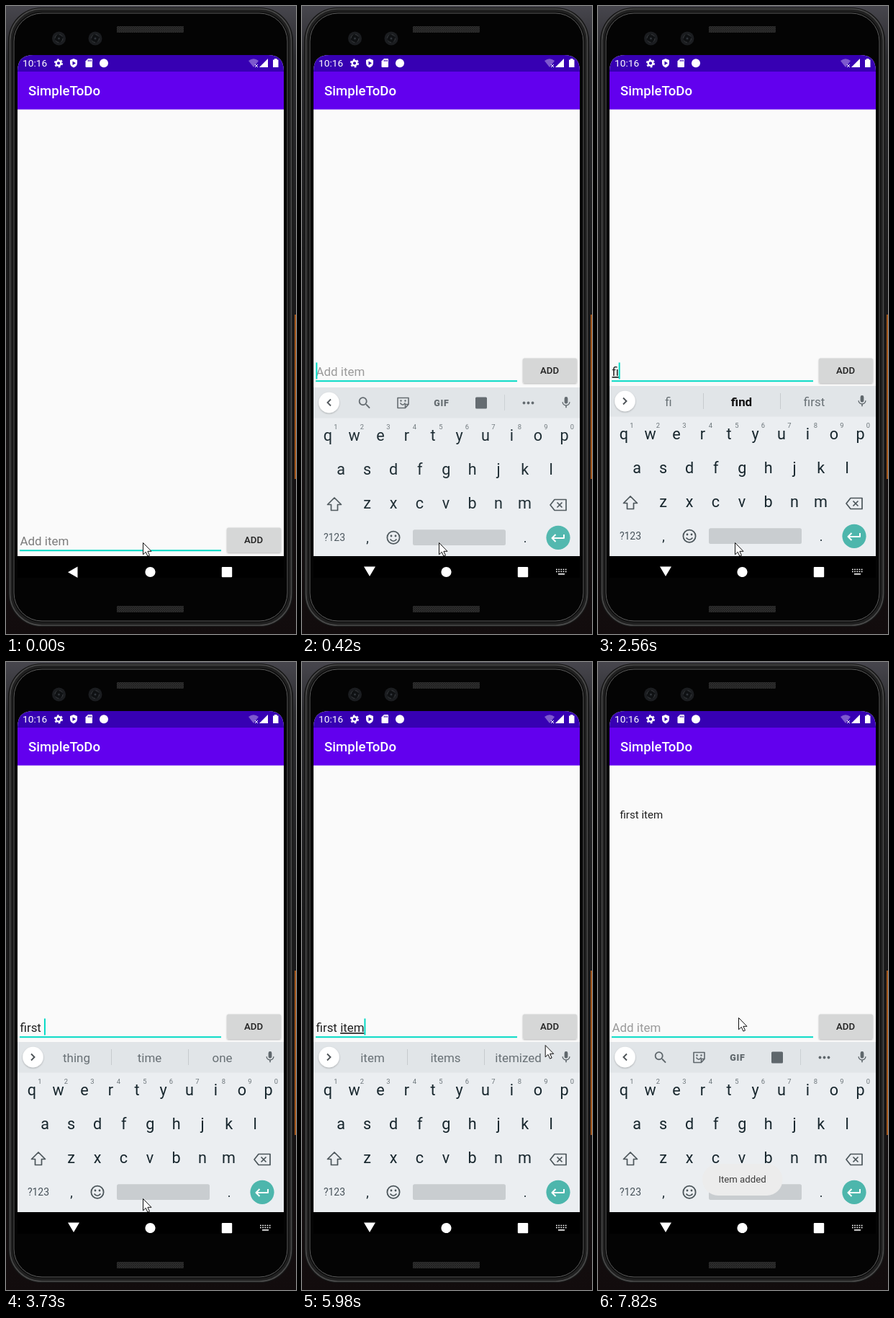
Write an HTML page that moves like this. It is 403x871 px and loops after 8 s.

```html
<!DOCTYPE html>
<html lang="en">
<head>
<meta charset="utf-8">
<title>To-do list demo</title>
<style>
  html, body { margin: 0; width: 100%; height: 100%; overflow: hidden; background: #111; }
  svg { display: block; width: 100vw; height: 100vh; }
  text { font-family: Roboto, sans-serif; white-space: pre; }
  .mid { text-anchor: middle; }
  .medium { font-weight: 500; }
  .underline { text-decoration: underline; text-decoration-thickness: 1px; text-decoration-skip-ink: none; }
</style>
</head>
<body>
<svg viewBox="0 0 403 871" preserveAspectRatio="none">
  <defs>
    <linearGradient id="desk" x2="0" y2="1">
      <stop offset="0" stop-color="#47464d"/><stop offset=".08" stop-color="#2b2b2e"/>
      <stop offset=".4" stop-color="#1b1b1c"/><stop offset="1" stop-color="#120c0d"/>
    </linearGradient>
    <pattern id="mesh" width="3" height="3" patternUnits="userSpaceOnUse">
      <rect width="3" height="3" fill="#303030"/>
      <path d="M0 0L3 3M3 0L0 3" stroke="#1b1b1b" stroke-width=".7"/>
    </pattern>
    <clipPath id="screen"><path d="M16 763V90Q16 68 38 68H364Q386 68 386 90V763Z"/></clipPath>
    <filter id="shadow" x="-20%" y="-20%" width="140%" height="150%">
      <feDropShadow dx="0" dy="1" stdDeviation="1" flood-opacity=".28"/>
    </filter>
  </defs>

  <rect width="403" height="871" fill="url(#desk)"/>
  <rect x="401" y="428" width="2" height="228" fill="#a3561b"/>
  <rect x="3" y="2" width="396" height="859" rx="46" fill="#161616"/>
  <rect x="5.5" y="4" width="391" height="855" rx="44" fill="#202020" stroke="#4b4b4b" stroke-width="1.5"/>
  <rect x="9" y="8" width="384" height="847" rx="41" fill="#0d0d0d"/>
  <rect x="11" y="10" width="380" height="843" rx="39" fill="#040404" stroke="#5c5c5c"/>
  <rect x="154" y="28" width="93" height="9" rx="1" fill="url(#mesh)"/>
  <rect x="154" y="832" width="93" height="9" rx="1" fill="url(#mesh)"/>
  <g id="cameras"></g>

  <g clip-path="url(#screen)">
    <rect x="16" y="68" width="370" height="695" fill="#fafafa"/>
    <rect x="16" y="91" width="370" height="52.500" fill="#6200ee"/>
    <rect x="16" y="68" width="370" height="23" fill="#3700b3"/>
    <text x="31" y="124" font-size="18.6" class="medium" fill="#fff">SimpleToDo</text>
    <g id="status" fill="#fff"></g>
    <text id="item" x="30.500" y="217" font-size="15.070" fill="#212121">first item</text>

    <g id="form">
      <text id="hint" x="19.500" y="513" font-size="16.960" fill="#999">Add item</text>
      <text id="field" x="19.500" y="513" font-size="16.960" fill="#212121"><tspan id="done"></tspan><tspan id="typing" class="underline"></tspan></text>
      <rect id="caret" y="494.500" width="2" height="23" fill="#03dac5"/>
      <rect x="19" y="519.200" width="280" height="2" fill="#03dac5"/>
      <rect id="button" x="307" y="488.500" width="75" height="34.500" rx="2" filter="url(#shadow)"/>
      <text x="344" y="510.300" font-size="13.190" class="mid medium" fill="#212121">ADD</text>
    </g>

    <g id="keyboard">
      <rect x="16" y="527" width="370" height="250" fill="#ebeef1"/>
      <rect x="16" y="527" width="370" height="42.500" fill="#e1e5e8"/>
      <circle cx="37.500" cy="548" r="14.300" fill="#fff" filter="url(#shadow)"/>
      <path id="chevron" fill="none" stroke="#4d5357" stroke-width="1.900"/>
      <g id="keys" fill="#17262d"></g>
      <g id="tools" fill="#5f676c"></g>
      <g id="words" font-size="16.960" class="mid" fill="#687075"></g>
    </g>

    <g id="toast">
      <rect x="145" y="696" width="111.500" height="44" rx="22" fill="#ececec"/>
      <text x="200.500" y="722" font-size="13.190" class="mid" fill="#3c3c3c">Item added</text>
    </g>
  </g>

  <rect x="16" y="763" width="370" height="30" fill="#000"/>
  <g fill="#fff">
    <path id="back"/>
    <circle cx="200.500" cy="785" r="7.100"/>
    <rect x="299.800" y="778" width="14.400" height="14.300" rx="1"/>
    <path id="switch" fill="none" stroke="#fff" stroke-width="1.600"
      d="M353 781.500H368M353 784.500H368" stroke-dasharray="1.700 1.500"/>
    <path id="switchBar" d="M356 787H365V788.600H356Z"/>
  </g>
  <path id="mouse" d="M0 0V16.300L3.800 12.800 6.400 18.600 9 17.500 6.400 11.800H11.500Z" fill="#fff" stroke="#111" stroke-linejoin="round"/>
</svg>

<script>
const $ = id => document.getElementById(id);
const set = (el, attrs) => { for (const k in attrs) el.setAttribute(k, attrs[k]); };
const add = (id, markup) => $(id).insertAdjacentHTML('beforeend', markup);
const label = (x, y, size, str, extra = '') =>
  `<text x="${x}" y="${y}" font-size="${size}" class="mid" ${extra}>${str}</text>`;
const icon = (cx, cy, size, d) =>
  `<path transform="translate(${cx - size / 2} ${cy - size / 2}) scale(${size / 24})" d="${d}"/>`;
const line = (d, width = 1.7, color = '#4b555a') =>
  `<path d="${d}" fill="none" stroke="${color}" stroke-width="${width}" stroke-linejoin="round"/>`;

const SEARCH = 'M15.500 14h-.79l-.28-.27A6.470 6.470 0 0 0 16 9.500 6.500 6.500 0 1 0 9.500 16c1.610 0 3.090-.59 4.230-1.570l.27.28v.79l5 4.990L20.490 19zM9.500 14a4.500 4.500 0 1 1 0-9 4.500 4.500 0 0 1 0 9z';
const MIC = 'M12 14c1.660 0 3-1.340 3-3V5a3 3 0 0 0-6 0v6c0 1.660 1.340 3 3 3zM17.300 11c0 3-2.540 5.100-5.300 5.100S6.700 14 6.700 11H5c0 3.410 2.720 6.230 6 6.720V21h2v-3.280c3.280-.48 6-3.300 6-6.720z';

function buildPhone() {
  for (const x of [73.5, 124])
    add('cameras', `<circle cx="${x}" cy="45" r="9.500" fill="#1b1d20"/>
      <circle cx="${x}" cy="45" r="5.500" fill="#0f1113" stroke="#3a3d40" stroke-dasharray="5 3.600"/>
      <circle cx="${x}" cy="45" r="1.500" fill="#30343a"/>`);

  add('status', `<text x="23" y="84.300" font-size="13.700">10:16</text>
    <circle cx="73" cy="79.300" r="3.300" fill="none" stroke="#fff" stroke-width="2.400"/>
    <circle cx="73" cy="79.300" r="5.200" fill="none" stroke="#fff" stroke-width="1.800" stroke-dasharray="2.720"/>
    <path d="M94 73L99 75V79Q99 83.500 94 85.500Q89 83.500 89 79V75Z"/>
    <path d="M92.500 76.500V82L97 79.200Z" fill="#3700b3"/>
    <path d="M114 73H119Q120 73 120 74V84Q120 85 119 85H111.500Q110.500 85 110.500 84V76.500Z"/>
    <path d="M114.300 74.500V77M116.300 74.500V77M118.300 74.500V77" stroke="#3700b3"/>
    <circle cx="136" cy="79.200" r="6"/>
    <path d="M344 85L337 76Q344 70.500 351 76Z" opacity=".35"/>
    <path d="M346 81L350 85M350 81L346 85" stroke="#fff"/>
    <path d="M352 85H364V73Z"/>
    <path d="M371 74.500H373V73H376.500V74.500H378.500V85H371Z"/>`);
}

function buildKeyboard() {
  const rows = [['qwertyuiop', 36, 600.5], ['asdfghjkl', 54.2, 648], ['zxcvbnm', 90.5, 695.3]];
  for (const [letters, x0, y] of rows)
    [...letters].forEach((c, i) => add('keys', label(x0 + 36.5 * i, y, 21.6, c)));
  for (let i = 0; i < 10; i++)
    add('keys', label(47 + 36.5 * i, 585.3, 9.4, (i + 1) % 10, 'fill="#6b7479"'));

  add('keys',
    line('M45 680L54.500 689.500H49.500V697.500H40.500V689.500H35.500Z') +
    line('M351 682.500H367V697.500H351L345 690Z') +
    line('M354.500 686.500L361.500 693.500M361.500 686.500L354.500 693.500') +
    label(45, 740.3, 14, '?123', 'fill="#47525a"') +
    label(91, 741.5, 18, ',') + label(310, 741.5, 18, '.') +
    `<circle cx="127" cy="735.300" r="8.600" fill="none" stroke="#4b555a" stroke-width="1.800"/>
     <circle cx="124" cy="733" r="1.400" fill="#4b555a"/><circle cx="130" cy="733" r="1.400" fill="#4b555a"/>` +
    line('M122.500 737.500Q127 743 131.500 737.500', 1.6) +
    `<rect x="154" y="724.300" width="129" height="21.700" rx="2.500" fill="#c9cdd0"/>
     <circle cx="356" cy="735.300" r="16.600" fill="#4db6ac"/>` +
    line('M364 731V736H348M352.500 731L347.500 736L352.500 741', 2, '#fff') +
    `<g fill="#5f676c">${icon(367, 548, 19, MIC)}</g>`);

  add('tools', icon(87, 548.5, 22, SEARCH) +
    line('M133 541.500H148V550.500L143.500 555.500H133ZM148 550.500H143.500V555.500', 1.6, '#5f676c') +
    line('M136.500 548.500Q140 554 143.500 548.500', 1.4, '#5f676c') +
    '<circle cx="137.500" cy="545.500" r="1.200"/><circle cx="143.500" cy="545.500" r="1.200"/>' +
    label(194, 552.5, 12.5, 'GIF', 'font-weight="900" letter-spacing=".8"') +
    '<rect x="241" y="540.500" width="16" height="16" rx="1.500"/>' +
    '<path d="M281 537V559H282V537Z" fill="#cbd0d3"/>' +
    [308.5, 314.5, 320.5].map(x => `<circle cx="${x}" cy="548.500" r="1.900"/>`).join(''));

  add('words', '<path d="M146.500 537V559M253.500 537V559" stroke="#c6cbce"/>' +
    [98, 199.5, 300.5].map(x => `<text x="${x}" y="555.200"></text>`).join(''));
}

// Each step changes part of the state and holds until the next one.
const steps = [
  [0, { open: 0, alpha: 0, dy: 0, text: '', from: 0, words: null, tools: 1, less: 1, caret: 0,
        item: 0, press: 0, toast: 0, mx: 190.5, my: 744.5 }],
  [120, { open: 1, alpha: .35, dy: 70, caret: 1 }],
  [270, { alpha: .8, dy: 16 }],
  [420, { alpha: .96, dy: 2 }],
  [570, { alpha: 1, dy: 0 }],
  [1140, { caret: 0 }],
  [1570, { caret: 1 }],
  [2150, { caret: 0 }],
  [2560, { text: 'fi', words: 'fi,find,first', bold: 1, tools: 0, less: 0, caret: 1 }],
  [2710, { text: 'fir', words: 'fir,first,fire' }],
  [2860, { text: 'firs', words: 'firs,first,firstly' }],
  [3450, { text: 'first', words: 'first,firstly,firsthand', bold: 0 }],
  [3730, { text: 'first ', from: 6, words: 'thing,time,one' }],
  [4160, { text: 'first i', words: 'i,in,is' }],
  [4310, { text: 'first it', words: 'it,item,its' }],
  [4560, { text: 'first ite', words: 'ite,item,items', bold: 1 }],
  [4710, { text: 'first item', words: 'item,items,itemized', bold: 0 }],
  [5170, { caret: 0 }],
  [5690, { caret: 1 }],
  [6130, { caret: 0 }],
  [6400, { press: 1 }],
  [6550, { press: .4, item: 1, text: '', from: 0, words: null, caret: 1 }],
  [6700, { press: 0, toast: .5 }],
  [6850, { toast: 1, tools: .6, less: 1 }],
  [7000, { tools: 1 }],
  [7400, { caret: 0 }]
];

// The pointer hops in a few discrete moves: start, gap, count, first place, last place, ease power.
const hops = [
  [5170, 137, 8, [265.5, 660.5], [349.5, 511.5], 1.6],
  [7400, 140, 4, [311, 507], [195.5, 493.5], 1.3]
];

function stateAt(t) {
  const s = {};
  for (const [at, patch] of steps) if (t >= at) Object.assign(s, patch);
  for (const [at, gap, n, a, b, pow] of hops) {
    if (t < at) continue;
    const p = Math.min(Math.floor((t - at) / gap), n - 1) / (n - 1);
    const e = 1 - (1 - p) ** pow;
    s.mx = a[0] + (b[0] - a[0]) * e;
    s.my = a[1] + (b[1] - a[1]) * e;
  }
  return s;
}

const show = (id, alpha) => set($(id), { opacity: alpha });

function render(t) {
  const s = stateAt(t);
  set($('form'), { transform: `translate(0 ${s.open ? 0 : 235})` });
  set($('hint'), { opacity: s.text ? 0 : 1, fill: s.open ? '#9a9a9a' : '#7c7c7c' });
  $('done').textContent = s.text.slice(0, s.from);
  $('typing').textContent = s.text.slice(s.from);
  const width = s.text ? $('field').getComputedTextLength() : 0;
  set($('caret'), { x: 19.3 + width, opacity: s.caret });
  const shade = 214 - Math.round(18 * s.press);
  set($('button'), { fill: `rgb(${shade},${shade + 1},${shade + 1})` });

  set($('keyboard'), { transform: `translate(0 ${s.dy})` });
  show('keyboard', s.alpha);
  show('tools', s.tools);
  show('words', s.words ? 1 : 0);
  set($('chevron'), { d: s.less ? 'M40 543.500L35.500 548L40 552.500' : 'M35 543.500L39.500 548L35 552.500' });
  if (s.words) {
    const list = s.words.split(',');
    $('words').querySelectorAll('text').forEach((el, i) => {
      const strong = i === 1 && s.bold;
      el.textContent = list[i];
      set(el, { 'font-weight': strong ? 700 : 400, fill: strong ? '#101010' : '#687075' });
    });
  }

  show('item', s.item);
  show('toast', s.toast);
  set($('back'), { d: s.open ? 'M86 777.500H102L94 791Z' : 'M86 785.300L99.500 777.500V793Z' });
  show('switch', s.open);
  show('switchBar', s.open);
  set($('mouse'), { transform: `translate(${s.mx} ${s.my})` });
}

buildPhone();
buildKeyboard();
const start = performance.now();
function tick() {
  render((performance.now() - start) % 8000);
  requestAnimationFrame(tick);
}
tick();
</script>
</body>
</html>
```
